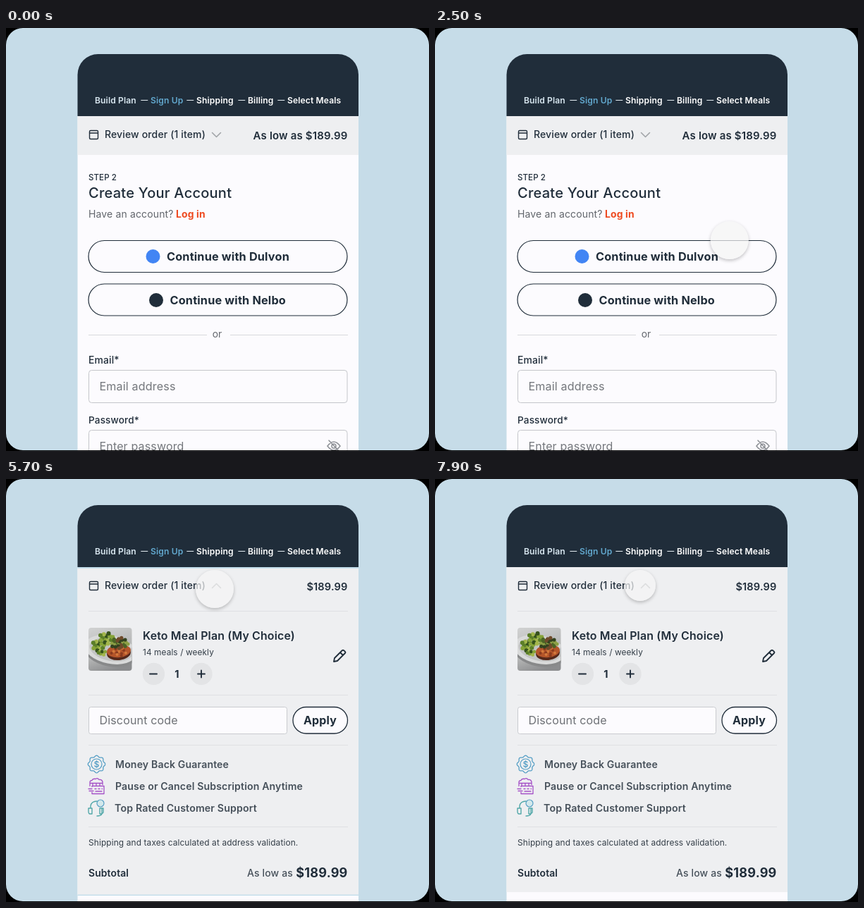
Recreate the animation shown at these times as an HTML page with a canvas. Size 600 by 600 pixels, loop 8 s.

```html
<!DOCTYPE html>
<html lang="en">
<head>
<meta charset="utf-8">
<title>Order review</title>
<style>
  html, body { margin: 0; width: 100%; height: 100%; overflow: hidden; background: #000; }
  canvas { display: block; width: 600px; height: 600px; }
</style>
</head>
<body>
<canvas id="stage" width="600" height="600"></canvas>
<script>
const ctx = document.getElementById('stage').getContext('2d');
const LOOP = 8000, STEP = 100;
const INK = '#202d3a', GREY = '#62666c', LINE = '#d8d9dc', PAPER = '#fcfbfe', PANEL = '#eeeff1';
const TOP = 125, CLOSED = 180, OPEN = 586;

const clamp = v => Math.max(0, Math.min(1, v));
const mix = (a, b, k) => a + (b - a) * k;
const ease = k => k < 0.5 ? 4 * k ** 3 : 1 - (2 - 2 * k) ** 3 / 2;
const ramp = (t, from, to) => ease(clamp((t - from) / (to - from)));

function text(str, x, y, size, weight = 500, color = INK, align = 'left') {
  ctx.font = `${weight} ${size}px Inter, "Open Sans", sans-serif`;
  ctx.letterSpacing = size * 0.01 + 'px';
  ctx.textAlign = align;
  ctx.fillStyle = color;
  ctx.fillText(str, x, y);
}

function box(x, y, w, h, r, fill, stroke, width = 1) {
  ctx.beginPath();
  ctx.roundRect(x, y, w, h, r);
  paint(fill, stroke, width);
}

function disc(x, y, r, fill, stroke, width) {
  ctx.beginPath();
  ctx.arc(x, y, r, 0, Math.PI * 2);
  paint(fill, stroke, width);
}

function oval(x, y, rx, ry, turn, color) {
  ctx.beginPath();
  ctx.ellipse(x, y, rx, ry, turn, 0, Math.PI * 2);
  paint(color);
}

function paint(fill, stroke, width = 1) {
  if (fill) { ctx.fillStyle = fill; ctx.fill(); }
  if (stroke) { ctx.strokeStyle = stroke; ctx.lineWidth = width; ctx.stroke(); }
}

function path(d, stroke, width = 1.5, x = 0, y = 0) {
  ctx.save();
  ctx.translate(x, y);
  ctx.lineCap = ctx.lineJoin = 'round';
  ctx.strokeStyle = stroke;
  ctx.lineWidth = width;
  ctx.stroke(new Path2D(d));
  ctx.restore();
}

function rule(x1, x2, y, color = LINE) {
  ctx.fillStyle = color;
  ctx.fillRect(x1, y, x2 - x1, 1);
}

function faded(alpha, draw) {
  if (alpha <= 0) return;
  ctx.save();
  ctx.globalAlpha *= alpha;
  draw();
  ctx.restore();
}

function clipped(x, y, w, h, r, draw) {
  ctx.save();
  ctx.beginPath();
  ctx.roundRect(x, y, w, h, r);
  ctx.clip();
  draw();
  ctx.restore();
}

function header() {
  ctx.fillStyle = INK;
  ctx.fillRect(101, 37, 400, TOP - 37);
  const steps = [['Build Plan', 126, '#d8e7f0'], ['Sign Up', 205, '#62a8ce'],
    ['Shipping', 270, '#fff'], ['Billing', 343, '#fff'], ['Select Meals', 399, '#fff']];
  steps.forEach(([label, x, color], i) => {
    text(label, x, 107, 12.1, 600, color);
    if (i) path('M0 0h9', '#e4edf2', 1.2, x - 13.2, 102.5);
  });
}

function signUpForm() {
  text('STEP 2', 117, 215.5, 11.5);
  text('Create Your Account', 117, 241, 20.1);
  text('Have an account?', 117, 268.5, 14, 400, GREY);
  text('Log in', 241, 268.5, 13.9, 700, '#ee4a20');

  box(117, 301.5, 367, 45, 22.5, PAPER, INK, 1.2);
  disc(208.5, 324, 10, '#4285f4');
  text('Continue with Dulvon', 228, 330, 16.3, 700);
  box(117, 363, 367, 45, 22.5, PAPER, INK, 1.2);
  disc(213, 386, 10, INK);
  text('Continue with Nelbo', 232.5, 392, 16.3, 700);

  rule(117, 285, 435);
  rule(318, 485, 435);
  text('or', 299.5, 438.5, 13.8, 400, GREY, 'center');

  text('Email*', 117, 476, 13.9);
  box(117.5, 485.5, 366.5, 46, 4, PAPER, '#c4c6ca');
  text('Email address', 132.5, 513.5, 16.1, 400, '#74777c');
  text('Password*', 117, 561, 13.6);
  box(117.5, 570.5, 366.5, 46, 4, PAPER, '#c4c6ca');
  text('Enter password', 132.5, 598.5, 16, 400, '#74777c');
  path('M-9 0Q0-12 9 0Q0 12-9 0M-7-8L8 8', '#8f9297', 1.6, 465, 593);
  disc(465, 593, 3, null, '#8f9297', 1.5);
}

// Spiral of small dots filling an oval
function florets(x, y, rx, ry, count, size, colors) {
  for (let i = 0; i < count; i++) {
    const a = i * 2.4, r = Math.sqrt(i / count);
    disc(x + Math.cos(a) * rx * r, y + Math.sin(a) * ry * r, size, colors[i % colors.length]);
  }
}

function meal() {
  clipped(117, 211, 61.5, 61, 4, () => {
    const table = ctx.createLinearGradient(130, 211, 150, 272);
    table.addColorStop(0, '#cfd0d0');
    table.addColorStop(0.6, '#b5b6b6');
    table.addColorStop(1, '#8b8c8e');
    ctx.fillStyle = table;
    ctx.fillRect(117, 211, 62, 62);
    oval(148, 246, 37, 20, 0.2, '#88898a');
    oval(148, 242, 37, 20, 0.2, '#d9dada');
    oval(149, 242, 31, 16, 0.2, '#c3c4c4');

    const greens = ['#5b7f28', '#86a338', '#36521c', '#a3b64c'];
    florets(131, 237, 9, 10, 14, 3, greens);
    florets(142, 226, 10, 9, 14, 3, greens);
    florets(136, 247, 6, 4, 6, 2.5, greens);
    oval(160, 247, 17, 10, -0.1, '#55281a');
    oval(160, 244, 17, 9, -0.1, '#b4552a');
    florets(160, 245, 13, 6, 12, 2, ['#d37a3c', '#8a3b1e']);
    florets(161, 233, 13, 8, 24, 2.6, ['#4c6426', '#8c9f45', '#33421f', '#6f4a2a']);
  });
}

function guarantees() {
  const blue = '#569fc5', purple = '#a552c7', teal = '#52a8a9';
  ctx.beginPath();
  for (let i = 0; i <= 96; i++) {
    const a = i / 96 * Math.PI * 2, r = 11.3 + Math.cos(a * 8);
    ctx.lineTo(128.5 + Math.cos(a) * r, 404.5 + Math.sin(a) * r);
  }
  paint(null, blue, 1.3);
  disc(128.5, 404.5, 7.5, null, blue, 1.2);
  text('$', 128.5, 408.7, 11.5, 600, blue, 'center');

  path('M-9 0V-5Q-9-8-6-8Q-5-11-1-10Q2-12 4-9Q8-10 9-6V-2M-9-4H9M-5-4V-1M0-4V-1M5-4V-1', purple, 1.3, 128, 435.5);
  path('M-6 1V0H11V11H-6V9M-11 4H-6M-10 7H-4M-2 4H0M3 4H5M8 4H8.5M-1 7.5H8', purple, 1.3, 128, 435.5);

  path('M-8 0V-3Q-7-10 1-10M8 0V8Q7 11 1 11M-11 0H-6V8H-9Q-11 8-11 4ZM5 0H10V6Q9 8 5 8Z', teal, 1.4, 128, 467);
  disc(134, 460, 5, '#d3e8eb', blue, 1.2);

  text('Money Back Guarantee', 155, 410, 14.1, 600, '#46505a');
  text('Pause or Cancel Subscription Anytime', 155, 441, 14.1, 600, '#46505a');
  text('Top Rated Customer Support', 154, 472, 14.2, 600, '#46505a');
}

function orderDetails() {
  [187, 306, 377, 493].forEach(y => rule(117, 485, y, '#dfe0e3'));
  meal();
  text('Keto Meal Plan (My Choice)', 194, 228, 15.9, 600);
  text('14 meals / weekly', 194, 250, 11.8, 400, '#343e48');
  disc(209.5, 276.5, 15.7, '#e3e4e6');
  disc(277, 276.5, 15.7, '#e3e4e6');
  path('M-5 0H5', INK, 1.9, 209, 276.5);
  path('M-5 0H5M0-5V5', INK, 1.9, 277, 276.5);
  text('1', 242.5, 281.5, 14.5, 700, INK, 'center');
  path('M-8 8L-7 3L4-8Q6-9 8-6Q9-5 8-4L-3 7ZM1-5L5-1', INK, 1.8, 473, 251);

  box(117.5, 323.5, 281, 38, 3, PAPER, '#c9cbcf');
  text('Discount code', 132.5, 347.5, 16, 400, '#6d7075');
  box(407, 323.5, 77.5, 37.5, 18.8, PAPER, INK, 1.3);
  text('Apply', 445.5, 348, 16, 700, INK, 'center');

  guarantees();
  text('Shipping and taxes calculated at address validation.', 117, 520, 11.9, 400, '#343e48');
  text('Subtotal', 117, 563.7, 13.9, 600);
  text('As low as', 342, 563.7, 14, 500, '#46505a');
  text('$189.99', 484.5, 564.7, 18.1, 700, INK, 'right');
}

function summaryBar(open) {
  box(118.5, 145.5, 12, 12, 1.5, null, INK, 1.4);
  path('M0 0H12', INK, 1.3, 118.5, 149);
  text('Review order (1 item)', 140, 155.8, 14);
  const dip = mix(3, -3, open);
  path(`M-6 ${-dip}L0 ${dip}L6 ${-dip}`, '#a1a4a8', 1.6, 298.5, 151.5);
  faded(1 - open, () => text('As low as $189.99', 484.5, 157.5, 15, 600, INK, 'right'));
  faded(open, () => text('$189.99', 484.5, 157.5, 14.6, 600, INK, 'right'));
}

function cursor(t) {
  const press = ramp(t, 4200, 4600) - ramp(t, 4750, 5150) + ramp(t, 7400, 7800);
  const travel = ramp(t, 1900, 3750);
  const r = mix(27, 22, press);
  const x = mix(410, 269, travel) + r, y = mix(297, 129, travel) + r;
  faded(clamp((t - 1100) / 900), () => {
    // Shadow stays outside the translucent disc
    ctx.save();
    ctx.beginPath();
    ctx.rect(0, 0, 600, 600);
    ctx.arc(x, y, r, 0, Math.PI * 2);
    ctx.clip('evenodd');
    ctx.shadowColor = 'rgba(0,0,0,.24)';
    ctx.shadowBlur = 5;
    ctx.shadowOffsetY = 2;
    disc(x, y, r, '#eee');
    ctx.restore();
    disc(x, y, r, 'rgba(246,246,246,.7)');
  });
}

function draw(t) {
  const open = ramp(t, 4900, 5600);
  const bottom = mix(CLOSED, OPEN, open);
  ctx.fillStyle = '#000';
  ctx.fillRect(0, 0, 600, 600);

  clipped(0, 0, 600, 599, 24, () => {
    ctx.fillStyle = '#c6dce8';
    ctx.fillRect(0, 0, 600, 600);
    clipped(101.5, 37, 398.5, 600, [29, 29, 0, 0], () => {
      ctx.fillStyle = PAPER;
      ctx.fillRect(101, TOP, 400, 475);
      ctx.save();
      ctx.translate(0, bottom - CLOSED);
      signUpForm();
      ctx.restore();

      clipped(101, TOP, 400, bottom - TOP, 0, () => {
        ctx.fillStyle = PANEL;
        ctx.fillRect(101, TOP, 400, 475);
        if (open > 0) orderDetails();
        summaryBar(open);
      });
      header();

      const glow = ramp(t, 5400, 5600) - ramp(t, 6100, 6500);
      faded(glow, () => {
        ctx.fillStyle = PANEL;
        ctx.fillRect(101, OPEN, 400, 4);
        ctx.fillStyle = '#c6dfec';
        ctx.fillRect(101, TOP, 400, 2);
        ctx.fillRect(101, 589.5, 400, 1.5);
      });
    });
    cursor(t);
  });
}

function tick() {
  const t = performance.now() % LOOP;
  draw(Math.floor(t / STEP) * STEP);
  requestAnimationFrame(tick);
}
tick();
</script>
</body>
</html>
```
